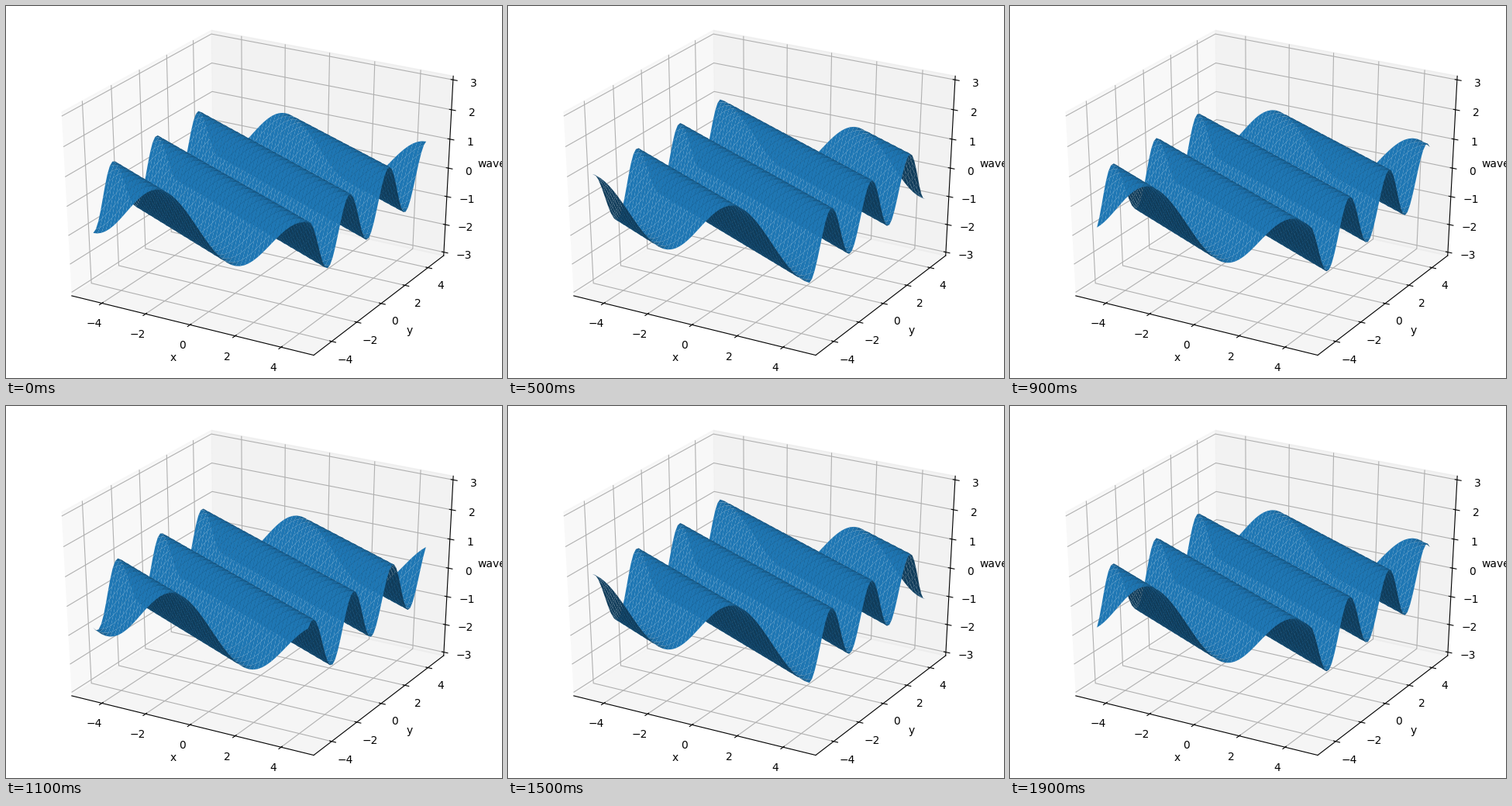
Recreate the animation shown at these times as a matplotlib script. Size 640 px wide and 480 px high, loop 2 s.

```python
import numpy as np
import matplotlib.pyplot as plt
from matplotlib.animation import FuncAnimation
from mpl_toolkits.mplot3d import Axes3D

FRAMES = 20
STEP = 2 * np.pi / 10          # phase advance per frame
EDGE = 1.5 * np.pi
POINTS = 50
BASE = np.array([0x1f, 0x77, 0xb4]) / 255


class WideAxes(Axes3D):
    """3D axes that fill the whole figure instead of a centred square."""

    def apply_aspect(self, position=None):
        pass


def padded(limit):
    """Symmetric limits with a small gap between the data range and the panes."""
    return -limit * 25 / 24, limit * 25 / 24


def face_colors(phase):
    """Shade each face by its slope, lit from the front left."""
    slope = np.cos(phase)
    light = (3 * slope + 0.5) / np.sqrt(1 + 5 * slope**2)
    light = (light - light.min()) / (light.max() - light.min())
    return (0.5 + 0.5 * light)[..., None] * BASE


fig = plt.figure(figsize=(6.4, 4.8), dpi=100)
ax = WideAxes(fig, rect=(0, 0, 1, 1), elev=30, azim=-60)
fig.add_axes(ax)
ax.set_box_aspect((1, 1, 1), zoom=np.sqrt(3) / 1.8294640721620434)

ax.set_xlim(*padded(1.1 * EDGE))
ax.set_ylim(*padded(1.1 * EDGE))
ax.set_zlim(*padded(3))
ax.set_xticks(range(-4, 5, 2))
ax.set_yticks(range(-4, 5, 2))
ax.set_zticks(range(-3, 4))
ax.set_xlabel("x")
ax.set_ylabel("y")
ax.set_zlabel("wave")

line = np.linspace(-EDGE, EDGE, POINTS)
X, Y = np.meshgrid(line, line)
half = (line[1] - line[0]) / 2


def update(i):
    for old in list(ax.collections):
        old.remove()
    phase = X + 2 * Y - STEP * i
    surface = ax.plot_surface(
        X, Y, np.sin(phase), rstride=1, cstride=1, shade=False,
        facecolors=face_colors(phase[:-1, :-1] + 3 * half))
    surface.set_edgecolor("none")
    return [surface]


anim = FuncAnimation(fig, update, frames=FRAMES, interval=100,
                     repeat=True, repeat_delay=0, blit=False)
plt.show()
```
